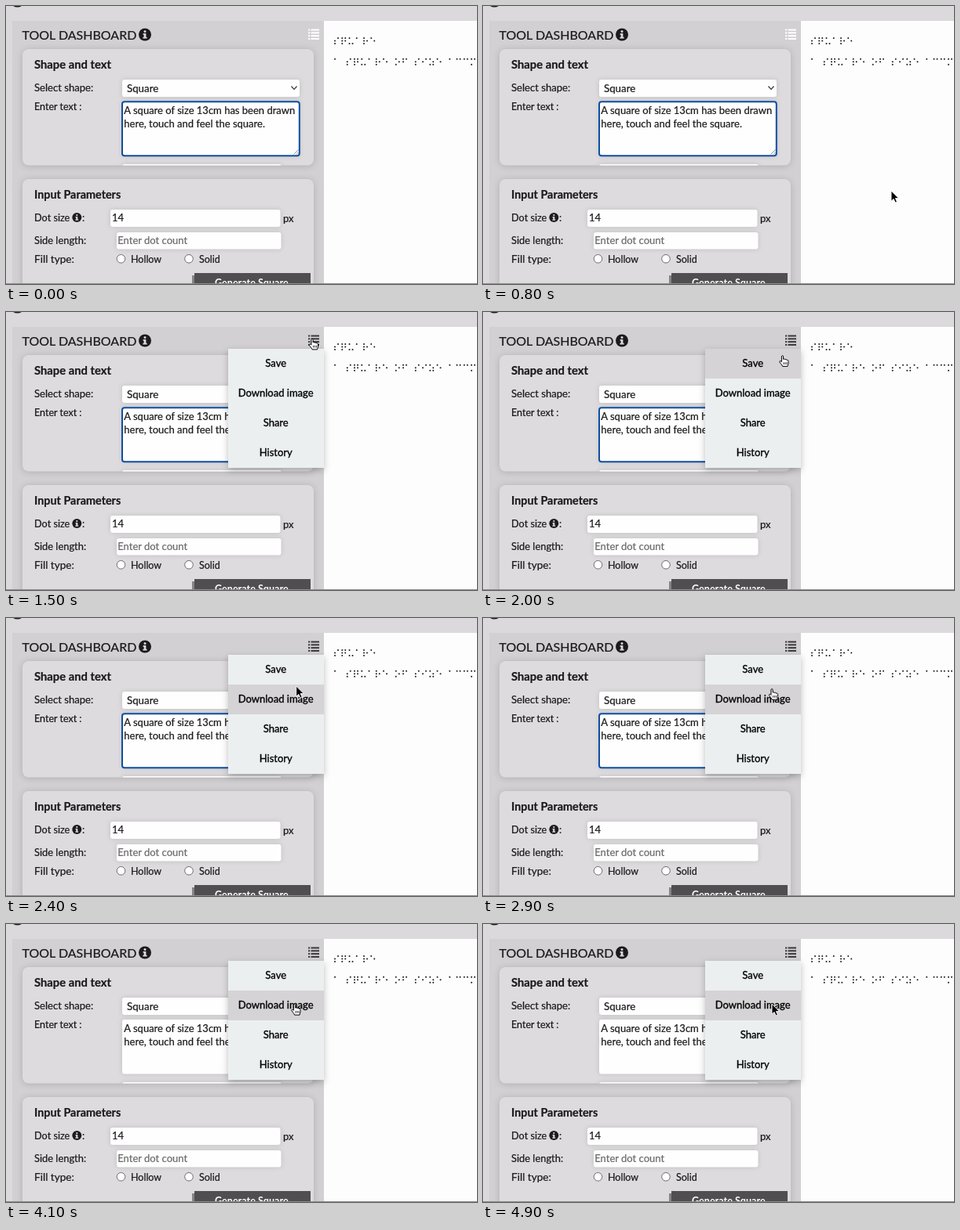
These frames come from a looping animation (600x355 px, 7.1 s). An HTML page:

```html
<!DOCTYPE html>
<html lang="en">
<head>
<meta charset="utf-8">
<title>Tool dashboard</title>
<style>
  html, body { margin: 0; width: 100%; height: 100%; overflow: hidden; background: #dbd9db; }
  svg { display: block; width: 100%; height: 100%; }
  text { font-family: Lato, "Open Sans", sans-serif; font-size: 13px; fill: #1c1a1c; stroke: #1c1a1c; stroke-width: .22px; white-space: pre; }
  .bold { font-weight: 700; }
  .hint { fill: #6b6a6b; stroke: #6b6a6b; }
  .light { fill: #fff; stroke: none; }
  .card { fill: #dddbdd; filter: drop-shadow(0 1px 4px rgba(0, 0, 0, .16)); }
  .field { fill: #fefefe; filter: drop-shadow(0 0 3px rgba(0, 0, 0, .12)); }
  .menu { filter: drop-shadow(0 3px 4px rgba(0, 0, 0, .25)); }
  .menu text { text-anchor: middle; fill: #050505; stroke: #050505; stroke-width: .35px; }
</style>
</head>
<body>
<svg viewBox="0 0 600 355" preserveAspectRatio="none">
  <defs>
    <g id="info">
      <circle r="8" fill="#1c1a1c"/>
      <circle cy="-4" r="1.5" fill="#dbd9db"/>
      <path d="M-2.4-1.4H1.4V3.3H2.6V5H-2.6V3.3H-1.4V.2H-2.4Z" fill="#dbd9db"/>
    </g>
    <clipPath id="upperCard"><rect x="21" y="55" width="371" height="148.5" rx="8"/></clipPath>
  </defs>

  <rect width="600" height="355" fill="#dbd9db"/>
  <circle cx="14.5" cy="-9" r="9.5" fill="#dbd9db" stroke="#1c1a1c" stroke-width="2"/>
  <rect x="8" y="19" width="397" height="336" fill="#d2d0d2"/>
  <rect x="405" y="19" width="195" height="336" fill="#fefdfe"/>
  <g id="braille" fill="#1c1a1c"></g>

  <use href="#info" x="177" y="36.5"/>
  <g id="listIcon"></g>

  <rect class="card" x="21" y="55" width="371" height="148.5" rx="8"/>
  <rect class="field" x="148" y="94" width="226" height="22" rx="3"/>
  <path d="M363.5 102.5L367 106.3 370.5 102.5" fill="none" stroke="#333" stroke-width="1.2"/>
  <rect class="field" x="148" y="122" width="226" height="69.5" rx="3"/>
  <path d="M366.5 189.5L372.5 183.5M370 189.5L372.5 187" stroke="#777" stroke-width=".8"/>
  <rect id="focusRing" x="148" y="122.2" width="225.8" height="69" rx="3" fill="none" stroke="#0d4fa3" stroke-width="2"/>
  <g clip-path="url(#upperCard)"><rect class="field" x="148" y="202" width="203" height="20" rx="3"/></g>

  <rect class="card" x="21" y="221" width="371" height="160" rx="8"/>
  <rect class="field" x="133" y="260" width="216.5" height="22" rx="3"/>
  <rect class="field" x="141" y="289" width="209.5" height="21.5" rx="3"/>
  <use href="#info" transform="translate(90.3 270) scale(.75)"/>
  <g fill="#fefefe" stroke="#6e6d6e">
    <circle cx="146.5" cy="322.8" r="5.3"/>
    <circle cx="233" cy="322.8" r="5.3"/>
  </g>
  <rect x="237" y="344" width="4" height="11" fill="#858385"/>
  <rect x="240" y="341" width="148" height="14" fill="#504e50"/>

  <g id="labels"></g>
  <path id="caret" d="M326.5 143V158" stroke="#111"/>
  <rect y="354" width="600" height="1" fill="#8c8a8c"/>

  <g id="menu" class="menu">
    <rect x="283" y="47" width="122" height="152" fill="#eceff0"/>
    <rect id="hover" x="283" width="122" height="38" fill="#d5d3d5"/>
  </g>

  <path id="arrow" d="M0 0V13.2L3.1 10.4 5.1 15 7.4 14 5.4 9.6H9.5Z" fill="#000" stroke="#fff" stroke-width=".9"/>
  <g id="hand">
    <path d="M3.4 8.6V1.9C3.4.3 5.6.3 5.6 1.9V5.4C6 4.6 7.6 4.7 7.8 5.9 8.4 5.1 9.8 5.3 10 6.5 10.8 6 12 6.4 12 7.6V10.5C12 12 11.2 13 11 14.4H4.6C4.2 12.6 1.8 10.6.9 8.9.4 7.7 1.8 7 2.6 7.8Z" fill="#fff" stroke="#000"/>
    <path d="M6 9.2V12M8 9.2V12M10 9.2V12" stroke="#000" stroke-width=".8"/>
  </g>
</svg>
<script>
const LOOP = 7100, STEP = 100;
const byId = id => document.getElementById(id);

function add(parent, tag, attrs, content) {
  const node = document.createElementNS("http://www.w3.org/2000/svg", tag);
  for (const key in attrs) node.setAttribute(key, attrs[key]);
  if (content) node.textContent = content;
  parent.appendChild(node);
  return node;
}

function label(content, x, y, size = 13, kind = "") {
  add(byId("labels"), "text", { x, y, class: kind, style: `font-size:${size}px` }, content);
}

label("TOOL DASHBOARD", 20.5, 43.3, 16);
label("Shape and text", 36, 79.5, 14.8, "bold");
label("Select shape:", 36, 109, 13.1);
label("Square", 154, 109.5, 13.3);
label("Enter text :", 36, 132.5, 12.5);
label("A square of size 13cm has been drawn", 150.3, 138);
label("here, touch and feel the square.", 150.3, 155.3);
label("Input Parameters", 36, 245.5, 14.4, "bold");
label("Dot size", 36, 275, 12.7);
label(":", 97, 275);
label("14", 135, 275.3);
label("px", 353, 275.5);
label("Side length:", 36, 304, 12.9);
label("Enter dot count", 142.3, 304.3, 13, "hint");
label("Fill type:", 36, 327.5, 13.6);
label("Hollow", 159, 328, 12.5);
label("Solid", 246, 328, 12.5);
label("Generate Square", 266, 358, 12.6, "bold light");

["Save", "Download image", "Share", "History"].forEach((item, i) =>
  add(byId("menu"), "text", { x: 343.7, y: 70.3 + 38 * i }, item));

for (let row = 0; row < 4; row++) {
  const y = 29.5 + row * 3.8;
  add(byId("listIcon"), "rect", { x: 385, y, width: 2.2, height: 2 });
  add(byId("listIcon"), "rect", { x: 388.5, y, width: 10.5, height: 2 });
}

const cells = { a: "1", c: "14", e: "15", f: "124", i: "24", m: "134", o: "135",
  q: "12345", r: "1235", s: "234", u: "136", z: "1356" };

function braille(phrase, x, y) {
  for (const letter of phrase) {
    for (const dot of cells[letter] || "") {
      const n = dot - 1;
      add(byId("braille"), "circle", { cx: x + (n > 2 ? 4 : 0), cy: y + n % 3 * 3.5, r: 1 });
    }
    x += letter === " " ? 6.5 : 9.25;
  }
}
braille("square", 419, 41);
braille("a square of size accm", 419, 67.8);

// Pointer stops: time, shape, x, y
const stops = [
  [600, "arrow", 579, 323], [800, "arrow", 520, 236], [1000, "arrow", 452, 144],
  [1200, "arrow", 409, 86], [1300, "arrow", 397, 70], [1400, "arrow", 388.7, 47.5],
  [1500, "hand", 385.5, 33.5], [1800, "hand", 385.5, 33.5], [1900, "hand", 381, 46],
  [2000, "hand", 377, 55], [2300, "hand", 366, 77], [2400, "arrow", 369.7, 87],
  [2500, "hand", 364, 86], [2600, "hand", 363.7, 88], [3100, "hand", 363.5, 91],
  [3200, "hand", 363.5, 91], [3400, "hand", 363, 98], [3800, "hand", 363, 98],
  [4200, "hand", 363, 103], [4900, "arrow", 368, 102]
];

function pointerAt(t) {
  const i = stops.findLastIndex(stop => stop[0] <= t);
  if (i < 0) return null;
  const [start, shape, x, y] = stops[i], next = stops[i + 1];
  if (!next || next[1] !== shape) return { shape, x, y };
  const k = (t - start) / (next[0] - start);
  return { shape, x: x + (next[2] - x) * k, y: y + (next[3] - y) * k };
}

const show = (id, visible) => byId(id).setAttribute("visibility", visible ? "visible" : "hidden");

function render(time) {
  const t = Math.floor(time % LOOP / STEP) * STEP;
  const open = t >= 1500;
  show("caret", (t >= 100 && t < 600) || (t >= 1100 && !open));
  show("focusRing", t < 3300);
  show("menu", open);
  show("hover", t >= 1900);
  byId("hover").setAttribute("y", t < 2400 ? 47 : 85);
  byId("listIcon").setAttribute("fill", open ? "#3b393b" : "#fff");

  const pointer = pointerAt(t);
  for (const shape of ["arrow", "hand"]) {
    const active = pointer && pointer.shape === shape;
    show(shape, active);
    if (active) byId(shape).setAttribute("transform", `translate(${pointer.x} ${pointer.y})`);
  }
}

const begin = performance.now();
function tick() {
  render(performance.now() - begin);
  requestAnimationFrame(tick);
}
tick();
</script>
</body>
</html>
```
